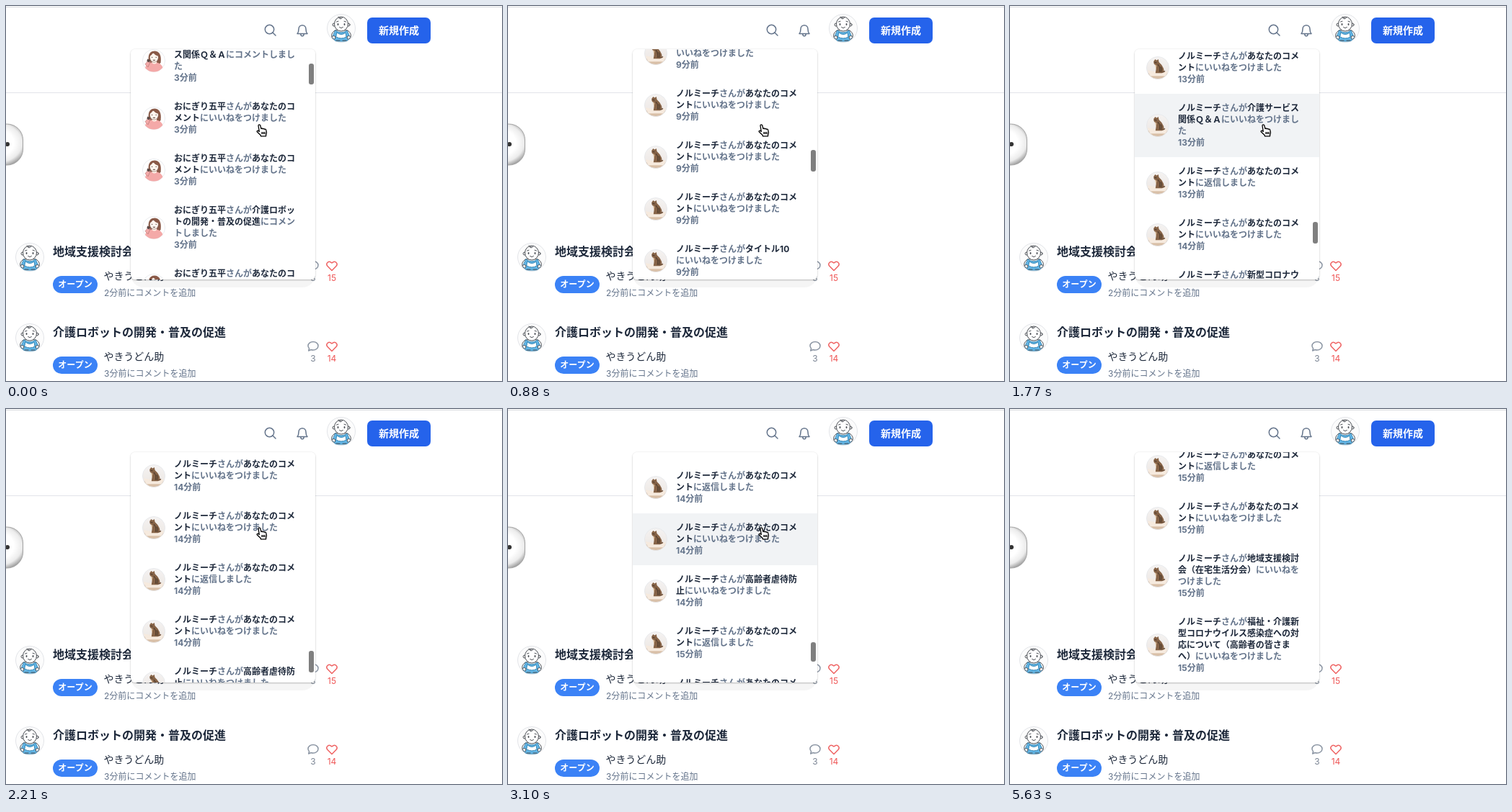
An HTML page for the animation above (6.23 s loop, 688 by 521 pixels).

```html
<!DOCTYPE html>
<html lang="ja">
<head>
<meta charset="utf-8">
<title>通知一覧</title>
<style>
  html, body { margin: 0; width: 100%; height: 100%; overflow: hidden; background: #fff; }
  body { position: relative; font-family: Inter, "Noto Sans CJK JP", "Noto Sans CJK", sans-serif; text-spacing-trim: space-all; }
  svg { display: block; }
  #page, #pointer { position: absolute; left: 0; top: 0; }
  #page text { fill: #1e293b; }
  #page .small { font-size: 12px; fill: #64748b; }
  #page .white { fill: #fff; font-weight: 600; text-anchor: middle; }
  #page .count { font-size: 12px; text-anchor: middle; }
  .icon { fill: none; stroke: #64748b; stroke-width: 1.5; stroke-linecap: round; stroke-linejoin: round; }
  #shade { position: absolute; left: 173px; top: 360px; width: 256px; height: 31px; border-radius: 0 0 18px 18px; background: rgba(0,0,0,.04); }
  #panel { position: absolute; left: 173px; top: 60px; width: 256px; height: 320px; overflow: hidden; background: #fff; border-radius: 6px; }
  #frame { position: absolute; left: 173px; top: 60px; width: 256px; height: 320px; border-radius: 6px; box-shadow: 0 0 2px rgba(0,0,0,.12), 0 1px 2px rgba(0,0,0,.22); }
  #list { position: absolute; left: 0; top: 0; width: 256px; }
  .item { display: flex; align-items: center; padding: 12px 16px; }
  .item.hover { background: #f1f3f5; }
  .item svg { flex: none; margin-right: 12px; }
  .item div { width: 168.5px; flex: none; font-weight: 700; font-size: 12px; line-height: 16px; color: #64748b; }
  .item b { color: #1e293b; }
  .item span { display: block; }
  #spinner { height: 19px; }
  #spinner svg { margin: 0 auto; }
  #thumb { position: absolute; left: 247px; width: 7px; border-radius: 3px; background: #7f7f7f; }
</style>
</head>
<body>
<svg id="page" width="688" height="521">
  <defs>
    <radialGradient id="shell" cx=".5" cy=".46" r=".6">
      <stop offset=".55" stop-color="#fff"/><stop offset=".8" stop-color="#ececec"/><stop offset="1" stop-color="#999"/>
    </radialGradient>
    <linearGradient id="wall" x2="0" y2="1">
      <stop stop-color="#f5f3f2"/><stop offset="1" stop-color="#ebe5e1"/>
    </linearGradient>
    <clipPath id="round"><circle cx="20" cy="20" r="19.5"/></clipPath>
    <symbol id="baby" viewBox="0 0 40 40">
      <circle cx="20" cy="20" r="19.5" fill="#fcfcfc" stroke="#e2e4e8"/>
      <g clip-path="url(#round)" stroke="#4b4f55" stroke-width="1" stroke-linecap="round">
        <path d="M11 23q-7 5-3 11l5 3h14l5-3q4-6-3-11z" fill="#fff"/>
        <path d="M12 23q8 6 16 0l4 9-4 6H12l-4-6z" fill="#62b5e5" stroke="#3687b5"/>
        <path d="M14 26q6 5 12 0l1 6q-7 4-14 0z" fill="#fff" stroke="#3687b5"/>
        <circle cx="10" cy="15" r="2" fill="#fff"/><circle cx="30" cy="15" r="2" fill="#fff"/>
        <ellipse cx="20" cy="14" rx="9.5" ry="10" fill="#fff"/>
        <path d="M18 4.500q2 4 4 0M16 4q1 3 3 3M13.500 11l2.500-.8M24 10.200l2.500.8M17.500 18.500q2.500 2.500 5 0" fill="none"/>
        <path d="M15.500 14v1M24.500 14v1" stroke-width="1.800"/>
        <path d="M7 32q3-3 5 0l-1 3M33 32q-3-3-5 0l1 3M13 37h5M22 37h5" fill="#fff"/>
      </g>
    </symbol>
    <symbol id="woman" viewBox="0 0 40 40">
      <circle cx="20" cy="20" r="19.5" fill="#fff" stroke="#e5e7eb"/>
      <g clip-path="url(#round)">
        <path d="M11 20Q9 3 22 3q12 1 10 20l-3 4H14z" fill="#8a5a48"/>
        <path d="M4 40q0-15 11-17h11q11 3 11 17z" fill="#f4a9a8"/>
        <path d="M17 20h8v4q-4 3-8 0z" fill="#fff0e6"/>
        <ellipse cx="20.500" cy="14.500" rx="7.500" ry="8" fill="#fff6ef" stroke="#6b4a40" stroke-width=".7"/>
        <path d="M13 12q4-2 6-6 3 5 9 6-1-8-8-8-7 1-7 8" fill="#8a5a48"/>
        <path d="M17 13.500v1.500M24 13.500v1.500M18.500 19h4" stroke="#4a3833" stroke-width="1.300"/>
        <path d="M5 26l6-7 3 3-4 9z" fill="#f4a9a8" stroke="#a56b68" stroke-width=".7"/>
        <path d="M9 17l5 2-2 4-4-2z" fill="#5a4844"/>
      </g>
    </symbol>
    <symbol id="cat" viewBox="0 0 40 40">
      <g clip-path="url(#round)">
        <path d="M0 0h40v40H0z" fill="url(#wall)"/>
        <path d="M0 29h40v11H0z" fill="#d9c0a8"/>
        <path d="M2 24l16 3 20-1-5 8H7z" fill="#f6eade"/>
        <path d="M13 8l2.500-3 2.500 2 3-2 1 5q6 5 8 11t-3 8H16l1-7-1-7q-4-2-3-7" fill="#866347"/>
        <path d="M20 14q5 5 3 13M25 18q3 5 0 9M14 10l4 1" stroke="#4f3c2d" stroke-width="1.500" fill="none"/>
        <path d="M15 14l3 2-1 7z" fill="#d9bd9d"/>
        <path d="M27 27q4 1 5-2" stroke="#6b4e38" stroke-width="2" fill="none"/>
      </g>
      <circle cx="20" cy="20" r="19.500" fill="none" stroke="#e5e7eb"/>
    </symbol>
    <path id="bubble" class="icon" style="stroke:#8b95a3" d="M0-6.500c4 0 7 2.500 7 5.700S4 5 0 5q-1.600 0-3-.5L-6.300 6l.9-3.300Q-7 1-7-.8C-7-4-4-6.500 0-6.500z"/>
    <path id="heart" class="icon" style="stroke:#ef6464" d="M0 6.500l-5.900-6C-9.200-3-4.500-8.500 0-4 4.500-8.500 9.200-3 5.900.5z"/>
  </defs>
  <path d="M0 1.500h688" stroke="#d9dbe0"/>
  <path d="M0 120.500h688" stroke="#e2e4ea"/>
  <g class="icon">
    <circle cx="365.500" cy="32.500" r="6.200"/><path d="M370 37l4 4"/>
    <path d="M404 38.500q2-2 2-6.500c0-7 10-7 10 0q0 4.500 2 6.500zM408.800 39c0 3.500 4.400 3.500 4.400 0"/>
  </g>
  <use href="#baby" x="445" y="11" width="40" height="40"/>
  <rect x="501" y="16" width="88" height="36" rx="7" fill="#2563eb"/>
  <text class="white" x="545" y="39" font-size="14">新規作成</text>
  <rect x="-50" y="164" width="73.500" height="57" rx="22" fill="url(#shell)" stroke="#a3a3a3"/>
  <circle cx="2" cy="192" r="3" fill="#333"/>
  <g id="posts"></g>
</svg>
<div id="shade"></div>
<div id="frame"></div>
<div id="panel"><div id="list"></div><div id="thumb"></div></div>
<svg id="pointer" width="688" height="521">
  <g stroke-linejoin="round">
    <path id="hand" fill="#fff" stroke="#000" stroke-width="1.300" d="M3 2.200C3 .6 5.400.4 5.800 2L7 6.600c.3-.9 2-.8 2.300.3.500-.8 2-.6 2.200.5.600-.6 2-.3 2.200.8l.7 3.300c.2 1.400-.6 2.600-.8 3.500v1.800H6.500L6.200 15.500 1.500 11C.4 9.600 1.800 8.600 3 9.400l1.300 1zM8 11v3M10 11v3M12 11v3"/>
    <path id="arrow" fill="#000" stroke="#fff" d="M0 0v15l3.500-3.300 2.300 5.300 2.600-1.100-2.300-5.200H11z"/>
  </g>
</svg>
<script>
const LOOP = 6230, TICK = 148.1;
const VIEW = 320, TOP = 60;
const $ = id => document.getElementById(id);

// Posts behind the panel
const council = '地域支援検討会（在宅生活分会）';
const robot = '介護ロボットの開発・普及の促進';
const post = (y, title, minutes, likes) => `<g transform="translate(0 ${y})">
  <use href="#baby" x="13" y="0" width="40" height="40"/>
  <text x="65" y="18" font-size="16" font-weight="700">${title}</text>
  <rect x="65" y="46" width="62" height="24" rx="12" fill="#3b82f6"/>
  <text class="white" x="96" y="62" font-size="12">オープン</text>
  <text x="135.500" y="51" font-size="14">やきうどん助</text>
  <text class="small" x="136" y="74">${minutes}分前にコメントを追加</text>
  <use href="#bubble" x="426" y="32"/><use href="#heart" x="452" y="32"/>
  <text class="count" x="426" y="53" style="fill:#7b8594">3</text>
  <text class="count" x="452" y="53" style="fill:#ef5555">${likes}</text></g>`;
$('posts').innerHTML = post(329, council, 2, 15) + post(441, robot, 3, 14);

// Notifications
const list = $('list');
const rice = { name: 'おにぎり五平', face: 'woman' };
const cafe = { name: 'ノルミーチ', face: 'cat' };
const like = 'にいいねをつけました', reply = 'に返信しました', note = 'にコメントしました';
const mine = 'あなたのコメント', qa = '介護サービス関係Ｑ＆Ａ';

function add(user, subject, action, minutes, count = 1) {
  for (let i = 0; i < count; i++) {
    const item = document.createElement('div');
    item.className = 'item';
    item.innerHTML = `<svg width="32" height="32"><use href="#${user.face}" width="32" height="32"/></svg>` +
      `<div><b>${user.name}</b>さんが<b>${subject}</b>${action}<span>${minutes}分前</span></div>`;
    list.append(item);
  }
}
add(rice, mine, like, 3);
add(rice, robot, note, 3);
add(rice, qa, note, 3);
add(rice, mine, like, 3, 2);
add(rice, robot, note, 3);
add(rice, mine, like, 3);
add(rice, mine, like, 4, 4);
add(rice, qa, note, 5);
add(cafe, mine, like, 7, 2);
add(cafe, qa, like, 8);
add(cafe, mine, like, 9, 4);
add(cafe, 'テスト投稿', like, 9);
add(cafe, mine, like, 9, 3);
add(cafe, 'タイトル10', like, 9);
add(cafe, mine, reply, 10, 2);
add(cafe, mine, like, 11, 3);
add(cafe, robot, like, 12);
add(cafe, mine, like, 12, 4);
add(cafe, mine, like, 13);
add(cafe, qa, like, 13);
add(cafe, mine, reply, 13);
add(cafe, mine, like, 14);
add(cafe, '新型コロナウイルス感染症対策', like, 14);
add(cafe, mine, like, 14, 2);
add(cafe, mine, reply, 14);
add(cafe, mine, like, 14);
add(cafe, '高齢者虐待防止', like, 14);
add(cafe, mine, reply, 15);
const loadedFrom = list.children.length;
add(cafe, mine, reply, 15);
add(cafe, mine, like, 15);
add(cafe, council, like, 15);
add(cafe, '福祉・介護新型コロナウイルス感染症への対応について（高齢者の皆さまへ）', like, 15);
const items = [...list.children];

list.insertAdjacentHTML('beforeend', `<div id="spinner"><svg width="18" height="17">
  <path id="arc" d="M9 1a7.500 7.500 0 1 0 7.500 7.500" fill="none" stroke="#7c9cf5" stroke-width="1.600"/></svg></div>`);

// [tick, scroll offset]
const scrollKeys = [[0, 188], [6, 1478], [12, 2554], [16, 3067], [24, 3067], [27, 3384]];
function scrollAt(tick) {
  const next = scrollKeys.findIndex(key => key[0] > tick);
  if (next < 0) return scrollKeys.at(-1)[1];
  const [t0, y0] = scrollKeys[next - 1], [t1, y1] = scrollKeys[next];
  return Math.round(y0 + (y1 - y0) * (tick - t0) / (t1 - t0));
}
const within = (value, from, to) => value >= from && value < to;

function draw(ms) {
  const tick = Math.floor((ms + 18) / TICK);
  const loaded = tick >= 21;
  const scroll = scrollAt(tick);
  items.slice(loadedFrom).forEach(item => item.style.display = loaded ? '' : 'none');
  $('spinner').style.display = loaded ? 'none' : '';
  $('arc').setAttribute('transform', `rotate(${(tick - 17) * TICK * .36} 9 8.500)`);
  list.style.transform = `translateY(${-scroll}px)`;

  const hovering = tick === 12 || within(tick, 16, 25) || within(tick, 30, 34);
  const pointY = 164 - TOP + scroll;
  for (const item of items) {
    const top = item.offsetTop;
    item.classList.toggle('hover', hovering && within(pointY, top, top + item.offsetHeight));
  }

  const height = list.offsetHeight, track = VIEW - 4;
  const length = track * VIEW / height;
  const thumb = $('thumb').style;
  thumb.height = length + 'px';
  thumb.top = 2 + (track - length) * scroll / (height - VIEW) + 'px';
  thumb.opacity = tick < 30 ? 1 : tick < 31 ? .5 : 0;

  const move = Math.min(1, Math.max(0, (tick - 33) / 3));
  $('hand').style.display = move === 0 ? '' : 'none';
  $('arrow').style.display = move > 0 && tick < 38 ? '' : 'none';
  const place = `translate(${347 + 250 * move} ${164 + 338 * move})`;
  $('hand').setAttribute('transform', place);
  $('arrow').setAttribute('transform', place);
}

const start = performance.now();
function play() {
  draw((performance.now() - start) % LOOP);
  requestAnimationFrame(play);
}
play();
</script>
</body>
</html>
```
